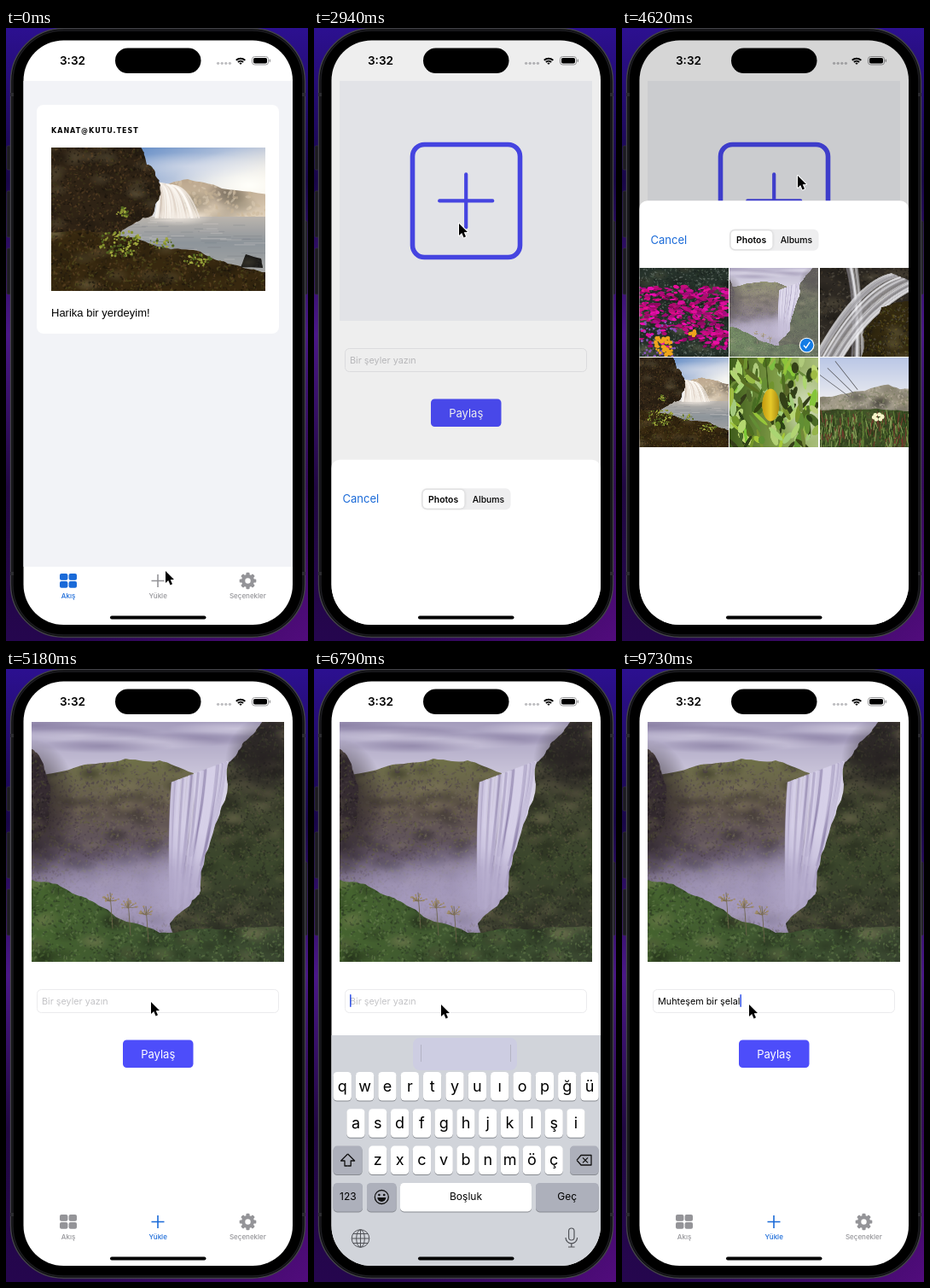
An HTML page with a canvas for the animation above (9800 ms loop, 354 px wide and 718 px high).

```html
<!DOCTYPE html>
<html lang="tr">
<head>
<meta charset="utf-8">
<title>Paylaşım</title>
<style>
html, body { margin: 0; width: 100%; height: 100%; overflow: hidden; background: #14053f; }
canvas { display: block; width: 354px; height: 718px; }
</style>
</head>
<body>
<canvas id="stage"></canvas>
<script>
const W = 354, H = 718, LOOP = 9800;
const SANS = 'Inter, Roboto, sans-serif';
const BLUE = '#1a6ad8', GREY = '#949498', VIOLET = '#4d4dfa';
const stage = document.getElementById('stage');
const dpr = window.devicePixelRatio || 1;
stage.width = W * dpr;
stage.height = H * dpr;
const c = stage.getContext('2d');

let seed = 7;
const rnd = () => (seed = (seed * 16807) % 2147483647) / 2147483647;
const span = (a, b) => a + rnd() * (b - a);
const clamp = v => Math.max(0, Math.min(1, v));
const progress = (t, from, to) => clamp((t - from) / (to - from));
const easeOut = (x, p) => 1 - Math.pow(1 - x, p);
const spring = (ms, w) => {
  const x = Math.max(0, ms) / 1000 * w;
  return 1 - (1 + x) * Math.exp(-x);
};
const times = (n, f) => { for (let i = 0; i < n; i++) f(i); };

// ---- drawing helpers ----
function box(x, y, w, h, r, fill, stroke, lw = 1) {
  c.beginPath();
  c.roundRect(x, y, w, h, r);
  if (fill) { c.fillStyle = fill; c.fill(); }
  if (stroke) { c.strokeStyle = stroke; c.lineWidth = lw; c.stroke(); }
}
function text(s, x, y, font, color, align = 'center') {
  c.font = font;
  c.fillStyle = color;
  c.textAlign = align;
  c.fillText(s, x, y);
}
function oval(g, x, y, rx, ry, fill, turn = 0) {
  g.beginPath();
  g.ellipse(x, y, rx, ry, turn, 0, 7);
  g.fillStyle = fill;
  g.fill();
}
const dot = (g, x, y, r, fill) => oval(g, x, y, r, r, fill);
function trace(g, pts) {
  g.beginPath();
  for (let i = 0; i < pts.length; i += 2) g.lineTo(pts[i], pts[i + 1]);
}
function line(g, pts, color, lw) {
  trace(g, pts);
  g.strokeStyle = color;
  g.lineWidth = lw;
  g.stroke();
}
function arc(x, y, r, from, to, color, lw) {
  c.beginPath();
  c.arc(x, y, r, from, to);
  c.strokeStyle = color;
  c.lineWidth = lw;
  c.stroke();
}
function plus(x, y, r, color, lw) {
  line(c, [x - r, y, x + r, y], color, lw);
  line(c, [x, y - r, x, y + r], color, lw);
}

// ---- photos ----
function photo(w, h, paint) {
  const img = document.createElement('canvas');
  img.width = w * 2;
  img.height = h * 2;
  const g = img.getContext('2d');
  g.scale(2, 2);
  g.lineCap = 'round';
  paint(g, w, h);
  return img;
}
function fade(g, x0, y0, x1, y1, ...stops) {
  const f = g.createLinearGradient(x0, y0, x1, y1);
  stops.forEach((s, i) => f.addColorStop(i / (stops.length - 1), s));
  return f;
}
function glow(g, x, y, rx, ry, rgb, alpha) {
  g.save();
  g.translate(x, y);
  g.scale(rx, ry);
  const f = g.createRadialGradient(0, 0, 0, 0, 0, 1);
  f.addColorStop(0, `rgba(${rgb},${alpha})`);
  f.addColorStop(.5, `rgba(${rgb},${alpha * .55})`);
  f.addColorStop(1, `rgba(${rgb},0)`);
  g.fillStyle = f;
  g.fillRect(-1, -1, 2, 2);
  g.restore();
}
// Midpoint displacement turns a few corners into a natural outline
function ragged(pts, amp) {
  for (; amp > .4; amp /= 2) {
    const next = [];
    for (let i = 0; i < pts.length; i += 2) {
      const j = (i + 2) % pts.length;
      next.push(pts[i], pts[i + 1],
        (pts[i] + pts[j]) / 2 + span(-amp, amp), (pts[i + 1] + pts[j + 1]) / 2 + span(-amp, amp));
    }
    pts = next;
  }
  return pts;
}
// Ground or rock: a ragged outline with broad shading and fine flecks
function land(g, pts, amp, fill, size, tones) {
  const xs = pts.filter((_, i) => i % 2 === 0), ys = pts.filter((_, i) => i % 2);
  const x0 = Math.min(...xs), x1 = Math.max(...xs), y0 = Math.min(...ys), y1 = Math.max(...ys);
  const n = (x1 - x0) * (y1 - y0) / (size * size * 4);
  g.save();
  trace(g, ragged(pts, amp));
  g.fillStyle = fill;
  g.fill();
  g.clip();
  times(n / 25, i => glow(g, span(x0, x1), span(y0, y1), size * 9, size * 5, i % 3 ? '10,10,8' : '160,150,110', .22));
  g.globalAlpha = .5;
  times(n, i => oval(g, span(x0, x1), span(y0, y1), size * span(.4, 1.3), size * span(.3, .7), tones[i % tones.length], span(0, 3)));
  g.restore();
}
function backgroundFill(g, w, h, fill) {
  g.fillStyle = fill;
  g.fillRect(0, 0, w, h);
}

const falls = photo(296, 281, (g, w, h) => {
  backgroundFill(g, w, h, fade(g, 0, 0, 0, 90, '#a59dbd', '#dcd8e8'));
  times(7, i => glow(g, span(0, 260), 4 + i * 4, 80, 9, i % 2 ? '228,224,240' : '118,106,146', .55));
  land(g, [-20, 68, 62, 50, 110, 43, 150, 45, 190, 60, 190, 300, -20, 300], 3,
    fade(g, 0, 45, 0, 215, '#6f7048', '#65594f', '#5d5062', '#8d82a2'), 1.8, ['#564a50', '#6f6658', '#62603f', '#483d46']);
  glow(g, 0, 100, 55, 80, '34,26,32', .95);
  land(g, [-20, 30, 6, 36, 22, 78, 14, 130, -20, 150], 5, '#352b31', 1.8, ['#211b20', '#4b4042', '#4d4f31']);
  // Water drops from a slanted lip and narrows as it falls
  times(150, i => {
    const u = span(0, 1), x = 164 + u * 66, y = 72 - u * 25;
    g.beginPath();
    g.moveTo(x, y);
    g.quadraticCurveTo(x - 4, y + 50, 162 + u * 40, span(150, 225));
    g.strokeStyle = i % 4 ? 'rgba(216,209,233,.5)' : 'rgba(138,126,168,.4)';
    g.lineWidth = 3;
    g.stroke();
  });
  times(9, i => glow(g, 40 + i * 19, 205 + 12 * Math.sin(i), 70, 55, '168,157,192', .5));
  glow(g, 178, 190, 45, 70, '184,175,208', .75);
  land(g, [262, 12, 276, -10, 320, -10, 320, 300, 190, 300, 162, 236, 198, 198, 214, 125, 230, 50], 5,
    fade(g, 0, 0, 0, 250, '#322c2d', '#414331', '#3b472c', '#36382c'), 1.8, ['#22241f', '#505b37', '#434f2e', '#2c3024', '#58523e']);
  glow(g, 272, 45, 45, 50, '30,24,28', .7);
  land(g, [-20, 182, 30, 190, 85, 218, 150, 247, 220, 243, 320, 236, 320, 300, -20, 300], 4,
    fade(g, 0, 190, w, 270, '#46652f', '#3e5530', '#3a4630'), 2, ['#25331d', '#55733a', '#47613a', '#6b8150', '#313c2a']);
  times(3, i => {
    const x = 92 + i * 21, y = 200 + i * 8;
    line(g, [x, y, x + 3, y + 42], '#6b6248', .8);
    times(16, () => {
      const a = span(3.2, 6.2), r = span(4, 11), px = x + Math.cos(a) * r, py = y + 10 + Math.sin(a) * r;
      line(g, [x, y + 10, px, py], '#7c6d50', .5);
      dot(g, px, py, 1, '#a08c6a');
    });
  });
});

const lagoon = photo(251, 168, (g, w, h) => {
  backgroundFill(g, w, h, fade(g, 110, 0, 150, 85, '#6d93c9', '#b4c3dc', '#efe6da'));
  glow(g, 232, 44, 90, 42, '255,255,250', 1);
  glow(g, 160, 22, 90, 16, '225,228,238', .6);
  land(g, [130, 44, 160, 37, 200, 48, 270, 56, 270, 90, 130, 90], 2, fade(g, 0, 38, 0, 84, '#bba68d', '#e2d3bd'), 3, ['#ddcdb5', '#cbb799']);
  g.fillStyle = fade(g, 0, 78, 0, 145, '#bfb8b0', '#8e959b', '#a5a6a5');
  g.fillRect(0, 81, w, h);
  times(60, i => {
    const x = span(80, 240), y = span(84, 132);
    line(g, [x, y, x + span(10, 35), y], i % 2 ? 'rgba(225,220,214,.25)' : 'rgba(100,108,114,.2)', 1.3);
  });
  times(90, i => {
    const u = span(0, 1);
    g.beginPath();
    g.moveTo(122 + u * 24, 41 + u * 4);
    g.quadraticCurveTo(128 + u * 34, 48, 122 + u * 52, 82);
    g.strokeStyle = i % 3 ? 'rgba(255,252,246,.55)' : 'rgba(205,190,176,.35)';
    g.lineWidth = 2;
    g.stroke();
  });
  glow(g, 150, 82, 40, 10, '245,238,230', .8);
  const rock = ['#120e09', '#4d3820', '#6b4d2a', '#211910', '#3f3a1b'];
  land(g, [-20, -20, 98, -20, 112, 20, 128, 44, 118, 80, 76, 104, -20, 116], 5, '#2f2315', 1.7, rock);
  land(g, [-20, 98, 50, 99, 110, 110, 175, 122, 218, 138, 270, 146, 270, 190, -20, 190], 4, '#37280f', 1.8, [...rock, '#5d5a22']);
  land(g, [222, 140, 228, 125, 246, 130, 248, 141], 1, '#1b1a18', 1.5, ['#2c2a26']);
  const shrub = (x, y, rx, ry, n) => times(n, i => {
    const a = span(0, 6.3), r = Math.sqrt(rnd());
    dot(g, x + Math.cos(a) * r * rx, y + Math.sin(a) * r * ry, span(.6, 1.7), ['#85922f', '#4f621f', '#a2a83e'][i % 3]);
  });
  shrub(84, 76, 8, 6, 30);
  shrub(82, 112, 26, 16, 130);
  shrub(130, 112, 16, 6, 30);
  shrub(172, 132, 16, 7, 50);
});

const flowers = photo(104, 104, (g, w, h) => {
  land(g, [-9, -9, 113, -9, 113, 113, -9, 113], 1, '#25312a', 1.4, ['#141c17', '#56655a', '#303f2e', '#828c86']);
  times(420, i => {
    const x = span(0, w), y = span(22, 96), bright = rnd();
    if (y > 100 - (1 - x / w) * 40 && i % 4) return;
    oval(g, x, y, span(2, 5), span(1, 2.2), `hsl(${span(315, 325)},88%,${26 + bright * 24}%)`, span(-.4, .4));
  });
  times(45, () => dot(g, span(0, 45), span(62, 104), span(.8, 1.8), '#8455b4'));
  times(55, () => dot(g, span(18, 38), span(80, 102), span(1, 2.6), '#efa51d'));
  times(9, () => dot(g, span(59, 66), span(72, 80), 2, '#efa51d'));
});

const rapids = photo(104, 104, (g, w, h) => {
  const rock = ['#151312', '#4a4030', '#5f5a4e', '#2a2620'];
  land(g, [-9, -9, 113, -9, 113, 113, -9, 113], 1, '#2f2a24', 1.8, rock);
  const stream = (n, x, y, mx, my, ex, spread) => times(n, i => {
    const o = span(-spread, spread);
    g.beginPath();
    g.moveTo(x + o, y + o * .4);
    g.quadraticCurveTo(mx + o * .5, my + o, ex + o, 108);
    g.strokeStyle = i % 4 ? 'rgba(238,238,242,.26)' : 'rgba(110,108,112,.3)';
    g.lineWidth = 2.2;
    g.stroke();
  });
  stream(26, 36, -4, 46, 40, 44, 8);
  stream(90, 100, 14, 50, 32, 8, 17);
  land(g, [113, 40, 72, 46, 50, 78, 44, 113, 113, 113], 5, '#33290f', 1.6, [...rock, '#6d5c22', '#55581f']);
});

const leaves = photo(104, 104, (g, w, h) => {
  backgroundFill(g, w, h, fade(g, 0, 0, w, 0, '#3f5c1c', '#7d9a45', '#a9be7c'));
  glow(g, 86, 56, 30, 45, '226,234,208', .8);
  times(150, i => oval(g, span(0, w), span(0, h), span(4, 13), span(1.5, 4.5),
    `hsl(${span(74, 92)},${span(40, 58)}%,${[17, 28, 38, 50, 64][i % 5]}%)`, span(.5, 2.4)));
  line(g, [42, 0, 45, 36], '#465e1e', 1.5);
  oval(g, 48, 55, 10, 19, fade(g, 38, 0, 58, 0, '#c49a10', '#e6c92a', '#a9890f'));
});

const dunes = photo(104, 104, (g, w, h) => {
  backgroundFill(g, w, h, fade(g, 0, 0, 0, 45, '#bac7e6', '#e8e9ef'));
  land(g, [-9, 47, 30, 42, 80, 31, 113, 38, 113, 113, -9, 113], 3, '#a39c8c', 1.6, ['#6f7956', '#c5bba9', '#85866a']);
  land(g, [-9, 62, 50, 60, 113, 64, 113, 113, -9, 113], 3, '#405427', 1.6, ['#263618', '#65803a', '#57412c']);
  times(230, i => {
    const x = span(0, w), y = span(74, 108);
    line(g, [x, y, x + span(-3, 3), y - span(6, 14)], ['#5f7d35', '#70392c', '#2c4019', '#839a55'][i % 4], 1.1);
  });
  times(3, i => line(g, [i * 9, 20 - i * 8, 34 + i * 5, 45 - i * 4], '#55565a', .7));
  times(7, a => dot(g, 68 + Math.cos(a) * 5, 69 + Math.sin(a) * 3, 2.4, '#f6f3c8'));
});

const album = [flowers, falls, rapids, lagoon, leaves, dunes];

// ---- device ----
function backdrop() {
  backgroundFill(c, W, H, fade(c, 0, 0, 0, H, '#2c1090', '#180648', '#4a1788', '#200742', '#25064e'));
  c.fillStyle = fade(c, W * .55, H * .8, W, H, 'rgba(96,14,140,0)', 'rgba(96,14,140,.75)');
  c.fillRect(0, 0, W, H);
  for (const [x, y, h] of [[1, 138, 28], [1, 191, 54], [1, 258, 54], [348, 226, 86]]) box(x, y, 5, h, 1.5, '#1c1b20', '#33323a', .8);
  box(5.5, .5, 345, 713, 62, '#08080a', '#424247', 1.5);
  box(8, 3, 340, 708, 59, '#000', '#1d1d21', 1.5);
  times(4, i => box(i % 2 ? 347 : 5, i < 2 ? 76 : 637, 4, 4, 0, '#2c2c30'));
}

function status() {
  text('3:32', 78, 42.8, `600 13.6px ${SANS}`, '#000');
  times(4, i => dot(c, 248.6 + i * 4.6, 41.3, 1.6, '#bdbdc0'));
  times(3, i => arc(275, 43, 1.3 + i * 3, -2.36, -.78, '#000', 2.1));
  box(288.5, 33.5, 19, 9.5, 3, null, '#98989a');
  box(290, 35, 16, 6.5, 1.8, '#000');
  box(308.6, 36.5, 1.4, 3.4, .7, '#98989a');
}

function tabs(active) {
  const tint = i => i === active ? BLUE : GREY;
  times(4, i => box(63 + (i % 2) * 10.6, 639 + (i >> 1) * 9, 9.4, 7.8, 2, tint(0)));
  plus(178, 647.5, 7.5, tint(1), 1.6);
  times(8, i => {
    c.save();
    c.translate(283.5, 647.5);
    c.rotate(i * Math.PI / 4);
    box(-2.1, -9.8, 4.2, 5, 1.2, tint(2));
    c.restore();
  });
  dot(c, 283.5, 647.5, 7.5, tint(2));
  dot(c, 283.5, 647.5, 3.2, '#fff');
  ['Akış', 'Yükle', 'Seçenekler'].forEach((s, i) => text(s, 73 + i * 105.2, 668.3, `500 8px ${SANS}`, tint(i)));
}

// ---- pages ----
function feed() {
  box(20, 62, 316, 569, 0, '#f2f3f7');
  box(36, 90, 284, 268, 8, '#fff');
  c.letterSpacing = '1px';
  text('KANAT@KUTU.TEST', 53, 122.5, 'bold 8px "DejaVu Sans", sans-serif', '#000', 'left');
  c.letterSpacing = '0px';
  c.drawImage(lagoon, 53, 140, 251, 168);
  text('Harika bir yerdeyim!', 53, 338, '13px "Liberation Sans", Arial, sans-serif', '#000', 'left');
  tabs(0);
}

// Two slow letters, a quick burst, then a steady pace
function typedCount(t) {
  if (t < 6930) return 0;
  if (t < 7700) return 1;
  if (t < 7980) return 2;
  return 7 + Math.floor((t - 7980) / 159);
}

function upload(t) {
  if (t < 4970) {
    box(30, 62, 296, 281, 0, '#f2f3f7');
    box(115.5, 136.5, 126, 132, 14, null, '#4a49f0', 5.6);
    c.lineCap = 'round';
    plus(178.2, 202.4, 31, '#4a49f0', 4.2);
    c.lineCap = 'butt';
  } else c.drawImage(falls, 30, 62, 296, 281);

  box(36.5, 375.5, 283, 27, 5, '#fff', '#ebebed');
  const value = 'Muhteşem bir şelal'.slice(0, typedCount(t));
  text(value || 'Bir şeyler yazın', 42, 393, `10.8px ${SANS}`, value ? '#000' : '#c4c4c7', 'left');
  if (t >= 5670) {
    c.globalAlpha = value ? 1 : 1 - progress(t, 6300, 6440) + progress(t, 6600, 6790);
    box(42 + (value ? c.measureText(value).width : 0), 381, 1.6, 15, .8, '#3a5ae8');
    c.globalAlpha = 1;
  }
  box(137, 434.5, 82.5, 32.5, 4.5, VIOLET);
  text('Paylaş', 178.2, 455.8, `13px ${SANS}`, '#fff');
  tabs(1);
}

function sheet(t) {
  const open = easeOut(progress(t, 2890, 3290), 3) - spring(t - 4550, 11.5);
  const off = 650 * (1 - open), k = clamp(off / 125), top = 74 + off;
  c.fillStyle = `rgba(0,0,0,${.2 * open})`;
  c.fillRect(20, 14, 316, 686);
  box(20, top, 316, 720, [10, 10, 0, 0], '#fff');
  const mid = top + 23 + 23 * k, grid = top + 45.5 + 33 * k;
  text('Cancel', 33.5, mid + 4.6, `13px ${SANS}`, BLUE, 'left');
  box(126, mid - 12.5, 104.5, 25, 6, '#eeeeef');
  c.shadowColor = 'rgba(0,0,0,.2)';
  c.shadowBlur = 3 * dpr;
  box(127.5, mid - 11, 49, 22, 5, '#fff');
  c.shadowColor = 'transparent';
  text('Photos', 151.6, mid + 3.8, `600 10.4px ${SANS}`, '#000');
  text('Albums', 204.4, mid + 3.8, `500 10.4px ${SANS}`, '#000');
  if (t < 3080) return;
  album.forEach((img, i) => {
    const s = Math.min(img.width, img.height);
    c.drawImage(img, (img.width - s) / 2, (img.height - s) / 2, s, s,
      20.4 + (i % 3) * 105.8, grid + (i > 2 ? 105.8 : 0), 104.2, 104.2);
  });
  if (t >= 4410) {
    box(126.2, grid, 104.2, 104.2, 0, 'rgba(255,255,255,.25)');
    const y = grid + 90.8;
    dot(c, 216.6, y, 8.8, '#fff');
    dot(c, 216.6, y, 7.7, '#147ce5');
    line(c, [213, y + .4, 215.6, y + 3.2, 220.2, y - 3.6], '#fff', 1.4);
  }
}

// ---- keyboard ----
const ROWS = [['qwertyuıopğü', 22.6, 26.35], ['asdfghjklşi', 38.3, 25.8], ['zxcvbnmöç', 64.1, 25.8]];
const rowY = i => 472 + i * 43.3;
function key(x, row, w, label, dark, size = 12) {
  const y = rowY(row);
  box(x, y + 1, w, 33.5, 4.5, '#888b91');
  box(x, y, w, 33.5, 4.5, dark ? '#adb0bb' : '#fff');
  text(label, x + w / 2, y + 16.5 + size * .34, `${size}px ${SANS}`, '#000');
}
function keyboard(shift) {
  const ink = '#111', soft = '#505257';
  c.save();
  c.translate(0, shift);
  c.lineJoin = 'round';
  box(20, 429, 316, 300, 0, '#d1d4da');
  box(116, 432, 122, 38, 8, '#cdcde2');
  for (const x of [125.5, 230.5]) line(c, [x, 440, x, 460], '#b3b3c4', 1);
  ROWS.forEach(([letters, x, step], row) => [...letters].forEach((s, i) => key(x + i * step, row, 21.3, s, false, 18)));
  key(22.6, 2, 34, '', true);
  key(300, 2, 33.5, '', true);
  key(22.6, 3, 34.4, '123', true);
  key(62, 3, 34.6, '', true);
  key(101, 3, 154, 'Boşluk');
  key(260, 3, 73.5, 'Geç', true);

  const half = [0, 568, 8, 576, 3.6, 576, 3.6, 582, 0, 582];
  for (const side of [-1, 1]) line(c, half.map((v, i) => i % 2 ? v : 39.6 + side * v), ink, 1.3);
  line(c, [308, 575.3, 313, 569.5, 325, 569.5, 325, 581, 313, 581, 308, 575.3], ink, 1.3);
  for (const d of [-3, 3]) line(c, [318 - 3, 575.3 - d, 318 + 3, 575.3 + d], ink, 1.2);

  arc(79.3, 618.5, 8, 0, 7, ink, 1.3);
  for (const d of [-2.9, 2.9]) dot(c, 79.3 + d, 616, 1.3, ink);
  c.beginPath();
  c.arc(79.3, 619, 5, 0, Math.PI);
  c.fill();

  arc(54.5, 667, 10.3, 0, 7, soft, 1);
  c.beginPath();
  c.ellipse(54.5, 667, 4.8, 10.3, 0, 0, 7);
  c.stroke();
  line(c, [54.5, 657, 54.5, 677], soft, 1);
  for (const d of [-5.5, 0, 5.5]) {
    const r = Math.sqrt(106 - d * d);
    line(c, [54.5 - r, 667 + d, 54.5 + r, 667 + d], soft, 1);
  }
  box(298.6, 655, 6.4, 14, 3.2, null, soft, 1.2);
  arc(301.8, 666, 6.8, 0, Math.PI, soft, 1.2);
  line(c, [301.8, 673, 301.8, 677], soft, 1.2);
  line(c, [298, 677, 305.6, 677], soft, 1.2);
  c.restore();
}

// ---- pointer: [start, end, x, y] ----
const MOVES = [[70, 140, 179, 648], [1330, 1890, 170, 229], [3990, 4410, 206, 173], [4690, 5110, 170, 390], [5250, 5460, 149, 393]];
function pointer(t) {
  let x = 187, y = 636;
  for (const [from, to, px, py] of MOVES) {
    const k = easeOut(progress(t, from, to), 2.1);
    x += (px - x) * k;
    y += (py - y) * k;
  }
  c.save();
  c.translate(x, y);
  trace(c, [0, 0, 0, 14, 3.2, 11.1, 5.6, 16.4, 8, 15.3, 5.7, 10.2, 10, 10]);
  c.closePath();
  c.lineJoin = 'round';
  c.strokeStyle = '#fff';
  c.lineWidth = 2;
  c.stroke();
  c.fillStyle = '#000';
  c.fill();
  c.restore();
}

function draw(t) {
  c.setTransform(dpr, 0, 0, dpr, 0, 0);
  backdrop();
  c.save();
  c.beginPath();
  c.roundRect(20.5, 14.5, 315.5, 684.5, 47);
  c.fillStyle = '#fff';
  c.fill();
  c.clip();
  if (t < 770) feed(); else upload(t);
  status();
  if (t >= 2890 && t < 5300) sheet(t);
  const up = spring(t - 5600, 13) * (1 - spring(t - 6930, 13));
  if (up > .005) keyboard(290 * (1 - up));
  box(122, 688.4, 112.5, 4, 2, '#000');
  c.restore();
  box(128, 23.5, 100.5, 29.5, 14.75, '#000');
  pointer(t);
}

const start = performance.now();
function tick() {
  draw((performance.now() - start) % LOOP);
  requestAnimationFrame(tick);
}
tick();
</script>
</body>
</html>
```
